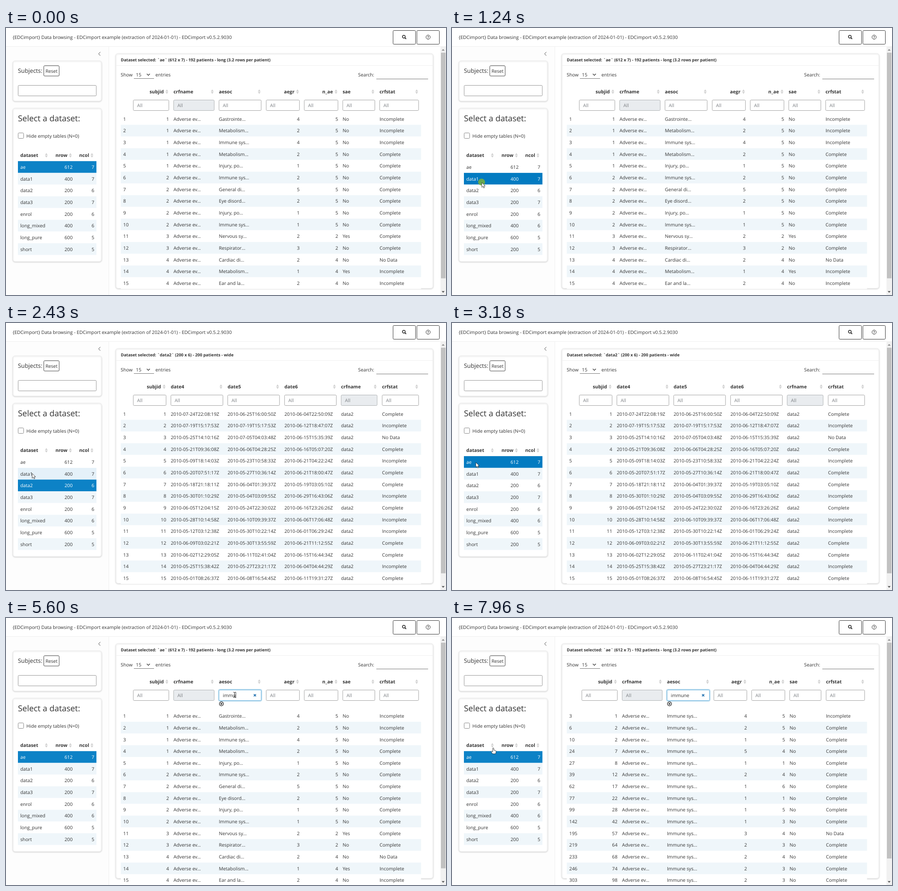
These frames come from a looping animation (960x584 px, 8000 ms). An HTML page with a canvas:

```html
<!DOCTYPE html>
<html lang="en">
<head>
<meta charset="utf-8">
<title>Data browsing</title>
<style>
html, body { margin: 0; width: 100%; height: 100%; overflow: hidden; background: #fff; }
canvas { display: block; }
</style>
</head>
<body>
<canvas id="stage" width="960" height="584"></canvas>
<script>
const ctx = document.getElementById('stage').getContext('2d');
const LOOP = 8000, ROW = 25.65, BASE = 10.26;
const INK = '#333', STRIPE = '#eff6fa', HOVER = '#e5f1f9', BLUE = '#007bc2';

// ---------- data ----------
const STATUS = { C: 'Complete', I: 'Incomplete', N: 'No Data' };
const words = s => s.split(' ');
const statuses = s => [...s].map(c => STATUS[c]);
const fill = value => Array(15).fill(value);
const count = Array.from({ length: 15 }, (_, i) => i + 1);
const pairs = list => count.map((_, i) => list[i >> 1]);
const dates = s => words(s).map(d => `2010-${d}Z`);

// Column: [name, left, right, align right, disabled filter]
const TABLES = {
  ae: {
    title: 'Dataset selected: `ae` (612 x 7) - 192 patients - long (3.2 rows per patient)',
    ids: count,
    columns: [['subjid', 277.5, 355.5, 1], ['crfname', 365.5, 454.5, 0, 1], ['aesoc', 464.5, 557],
      ['aegr', 567.5, 640.5, 1], ['n_ae', 650.5, 724.5, 1], ['sae', 734.5, 805], ['crfstat', 815, 900.5]],
    cells: [[...'111112222233444'], fill('Adverse ev...'),
      ['Gastrointe', 'Metabolism', 'Immune sys', 'Metabolism', 'Injury, po', 'Immune sys', 'General di',
       'Eye disord', 'Injury, po', 'Immune sys', 'Nervous sy', 'Respirator', 'Cardiac di', 'Metabolism',
       'Ear and la'].map(s => s + '...'),
      [...'424212521123212'], [...'555555555522444'],
      [...'NNNNNNNNNNYNNYN'].map(c => c === 'Y' ? 'Yes' : 'No'), statuses('IIICCCCCCCCCNII')]
  },
  data1: {
    title: 'Dataset selected: `data1` (400 x 7) - 200 patients - long (2 rows per patient)',
    ids: count,
    columns: [['subjid', 277.5, 336, 1], ['date1', 346, 455.5], ['date2', 466, 576], ['date3', 586, 696],
      ['x', 706, 744.5], ['crfname', 754.5, 822, 0, 1], ['crfstat', 832.5, 900.5]],
    cells: [pairs(count),
      pairs(dates('04-03T09:46:37 04-26T18:06:23 05-05T03:07:04 05-14T00:17:21 04-09T15:33:11 04-11T21:47:40 04-16T08:36:10 04-12T21:01:35')),
      pairs(dates('05-16T18:22:44 04-24T17:22:29 05-03T23:19:00 05-03T21:46:33 04-27T15:11:40 04-23T10:18:09 05-03T09:24:58 05-09T23:19:22')),
      pairs(dates('05-10T22:21:50 05-17T15:21:24 05-23T07:02:12 05-21T18:32:10 05-06T19:28:29 05-29T01:22:36 04-27T04:29:08 05-22T01:20:06')),
      [...'XXXXXXYYYYXXXXX'], fill('data1'), statuses('CCCCICNCICCCICC')]
  },
  data2: {
    title: 'Dataset selected: `data2` (200 x 6) - 200 patients - wide',
    ids: count,
    columns: [['subjid', 277.5, 349.5, 1], ['date4', 359.5, 473.5], ['date5', 483.5, 597], ['date6', 607.5, 721],
      ['crfname', 731, 810, 0, 1], ['crfstat', 820.5, 900.5]],
    cells: [count,
      dates('07-24T22:08:19 07-19T15:17:53 05-25T14:10:16 05-21T09:36:08 05-09T18:14:03 05-20T07:51:17 05-18T21:18:11 05-30T01:10:29 06-05T12:04:15 05-28T10:14:58 05-12T03:12:38 06-09T03:02:21 06-02T12:29:05 05-25T15:38:42 05-01T08:26:37'),
      dates('06-25T16:00:50 07-19T15:17:53 07-05T04:03:48 06-06T04:28:25 05-23T10:58:33 05-27T10:36:14 06-04T01:39:37 05-04T03:09:55 05-24T22:30:02 06-10T09:39:37 05-30T10:22:14 05-30T13:55:59 06-11T02:41:04 05-27T23:21:17 06-08T16:54:45'),
      dates('06-04T22:50:09 06-12T18:47:07 06-15T15:35:39 06-16T05:07:20 06-21T04:22:24 06-21T18:00:47 05-19T03:05:10 06-29T16:43:06 06-16T23:26:26 06-06T17:06:48 06-01T06:29:24 06-21T11:12:55 06-15T16:44:34 06-04T04:44:29 06-11T19:31:27'),
      fill('data2'), statuses('CINCICCICIICCIC')]
  }
};
TABLES.immune = {
  title: TABLES.ae.title,
  ids: words('3 6 10 24 27 39 62 77 99 142 195 219 233 246 303'),
  columns: [['subjid', 283, 361, 1], ['crfname', 371, 459, 0, 1], ['aesoc', 469, 562],
    ['aegr', 571, 643.5, 1], ['n_ae', 653.5, 726.5, 1], ['sae', 736.5, 805.5], ['crfstat', 816, 900.5]],
  cells: [words('1 2 2 7 8 12 17 22 28 42 57 64 68 74 98'), fill('Adverse ev...'), fill('Immune sys...'),
    [...'421512111132222'], [...'555414615343433'], fill('No'), statuses('ICCCCCCCCCNCCCC')]
};
const DATASETS = ['ae 612 7', 'data1 400 7', 'data2 200 6', 'data3 200 7', 'enrol 200 6',
  'long_mixed 400 6', 'long_pure 600 5', 'short 200 5'].map(words);

// ---------- timeline ----------
const SHOWN = [[0, 'ae'], [1500, 'data1'], [2370, 'data2'], [3400, 'ae'], [6130, 'immune']];
const SELECTED = [[0, 0], [1200, 1], [2000, 2], [3100, 0]];
const KEYS = [5070, 5270, 5400, 5600, 5800, 6060];
const CLICKS = [[1170, 1300], [1960, 2100], [3040, 3170], [4270, 4400]];
const CARET_OFF = [[4870, 5070], [6610, 7140], [7670, 8000]];
const FOCUS = 4270, CLEARABLE = 5070;
const PATH = [[200, 500, 540], [340, 322, 460], [560, 185, 403], [780, 95, 358], [960, 66, 346],
  [1030, 66, 343], [1240, 65, 338], [1500, 65, 338], [1960, 62, 354], [2100, 62, 354], [2300, 59, 338],
  [2780, 52, 305], [3400, 52, 305], [3730, 418, 197], [4010, 498.5, 168], [7010, 498.5, 168],
  [7820, 97, 289], [7960, 90, 284]];

const current = (list, t) => list.filter(([start]) => start <= t).pop()[1];
const during = (spans, t) => spans.some(([a, b]) => t >= a && t < b);

function pointerAt(t) {
  if (t < PATH[0][0]) return null;
  const next = PATH.findIndex(p => p[0] > t);
  if (next < 0) return PATH[PATH.length - 1].slice(1);
  const [t0, x0, y0] = PATH[next - 1], [t1, x1, y1] = PATH[next];
  const k = (t - t0) / (t1 - t0);
  return [x0 + (x1 - x0) * k, y0 + (y1 - y0) * k];
}

// ---------- drawing helpers ----------
function text(s, x, y, { size = BASE, color = INK, bold = false, align = 'left' } = {}) {
  ctx.font = `${bold ? 700 : 400} ${size}px "Open Sans", sans-serif`;
  ctx.textAlign = align;
  ctx.fillStyle = color;
  ctx.fillText(s, x, y + size * 0.388);
}
function rect(x, y, w, h, color) {
  ctx.fillStyle = color;
  ctx.fillRect(x, y, w, h);
}
function box(x, y, w, h, radius, stroke, background = '#fff') {
  ctx.beginPath();
  ctx.roundRect(x, y, w, h, radius);
  ctx.fillStyle = background;
  ctx.fill();
  ctx.lineWidth = 1;
  ctx.strokeStyle = stroke;
  ctx.stroke();
}
function line(points, color, width = 1) {
  ctx.beginPath();
  for (const [x, y] of points) ctx.lineTo(x, y);
  ctx.strokeStyle = color;
  ctx.lineWidth = width;
  ctx.stroke();
}
function circle(x, y, r, color, width) {
  ctx.beginPath();
  ctx.arc(x, y, r, 0, 7);
  ctx.fillStyle = ctx.strokeStyle = color;
  ctx.lineWidth = width || 1;
  width ? ctx.stroke() : ctx.fill();
}
function polygon(points, color) {
  ctx.beginPath();
  for (const [x, y] of points) ctx.lineTo(x, y);
  ctx.closePath();
  ctx.fillStyle = color;
  ctx.fill();
}
function card(x, y, w, h) {
  ctx.save();
  ctx.shadowColor = 'rgba(0,0,0,.16)';
  ctx.shadowBlur = 3;
  ctx.shadowOffsetY = 1;
  box(x, y, w, h, 5, '#ebebeb');
  ctx.restore();
}
function sortIcon(x, y) {
  polygon([[x - 3, y - 0.5], [x, y - 5], [x + 3, y - 0.5]], '#d2d2d2');
  polygon([[x - 3, y + 0.5], [x, y + 5], [x + 3, y + 0.5]], '#d2d2d2');
}
function cross(x, y, r, color, width) {
  line([[x - r, y - r], [x + r, y + r]], color, width);
  line([[x + r, y - r], [x - r, y + r]], color, width);
}

// ---------- page parts ----------
function drawHeader() {
  text('{EDCimport} Data browsing - EDCimport example (extraction of 2024-01-01) - EDCimport v0.5.2.9030', 14.5, 20.3);
  rect(0, 40, 960, 1, '#efefef');
  box(844.5, 5.5, 49, 30, 2, '#3a3a3a');
  box(896.5, 5.5, 49, 30, 2, '#3a3a3a');
  circle(868, 19, 3, '#222', 1.4);
  line([[870.2, 21.2], [873, 24]], '#222', 1.8);
  circle(921, 20, 4.6, '#222', 0.9);
  text('?', 921, 20, { size: 7.5, bold: true, align: 'center' });
}

function drawSidebar(t, pointer) {
  rect(0, 41, 224, 543, '#fdfdfd');
  rect(224, 41, 1, 543, '#efefef');
  line([[205.8, 52.5], [202, 56.5], [205.8, 60.5]], '#444');
  card(15, 72, 193.5, 88);
  text('Subjects:', 26, 92.8, { size: 12.82 });
  box(82.5, 82.5, 33.5, 22.5, 2, '#444');
  text('Reset', 99.3, 94, { align: 'center' });
  box(26.5, 125.5, 170.5, 23, 2, '#999');

  card(15, 175.5, 193.5, 335.5);
  text('Select a dataset:', 26, 197, { size: 17.95 });
  box(26.5, 229.5, 12, 12, 2, '#888');
  text('Hide empty tables (N=0)', 44.6, 236);
  [['dataset', 31.2, 'left', 88], ['nrow', 134, 'right', 140.5], ['ncol', 181.3, 'right', 187.5]]
    .forEach(([name, x, align, icon]) => {
      text(name, x, 278.5, { bold: true, align });
      sortIcon(icon, 278.5);
    });

  const selected = current(SELECTED, t);
  DATASETS.forEach(([name, rows, cols], i) => {
    const top = 291.2 + i * ROW, mid = top + ROW / 2;
    const hovered = pointer && pointer[0] > 26 && pointer[0] < 197 && pointer[1] >= top && pointer[1] < top + ROW;
    let color = INK, background = hovered ? HOVER : i % 2 ? STRIPE : '#fff';
    if (i === selected) {
      color = '#fff';
      background = hovered ? '#037bc1' : '#0d82c6';
    } else if (i === 1 && t >= 2000 && t < 2100) color = '#34806f';
    rect(26, top, 171.3, ROW, background);
    text(name, 31.2, mid, { color });
    text(rows, 145.3, mid, { color, align: 'right' });
    text(cols, 192.5, mid, { color, align: 'right' });
  });
}

function drawFilter(t, x0, x1, typed, disabled, active) {
  const focus = active && t >= FOCUS ? Math.min(1, (t - FOCUS) / 150) : 0;
  if (focus) {
    ctx.globalAlpha = focus;
    box(x0 - 1.5, 155.5, x1 - x0 + 3, 27, 4, '#c5e1f1', '#bfdef0');
    ctx.globalAlpha = 1;
  }
  box(x0 + 0.25, 157.5, x1 - x0 - 0.5, 23, 2, focus ? '#6db4dd' : disabled ? '#b0b3b5' : '#a3a3a3', disabled ? '#e9ecef' : '#fff');
  const left = x0 + 8.6;
  text(typed || 'All', left, 168.9, { color: typed ? INK : '#7b7f83' });
  if (!active) return;
  if (focus && !during(CARET_OFF, t)) {
    rect(left + (typed ? ctx.measureText(typed).width : 0), 162, 0.8, 13, '#111');
  }
  if (t >= CLEARABLE) {
    cross(x1 - 14, 169, 2.4, '#1f6fae', 1.6);
    circle(x0 + 5.5, 187.8, 4.4, '#111', 1.2);
    cross(x0 + 5.5, 187.8, 1.9, '#111', 1.2);
  }
}

function drawTable(t, pointer) {
  const table = TABLES[current(SHOWN, t)];
  card(239.5, 56, 692.5, 513.5);
  text(table.title, 250.5, 69.3, { size: 8.97, bold: true });
  rect(240, 81.5, 692, 1, '#efefef');
  text('Show', 250.3, 101.7);
  text('15', 283.6, 101.7);
  line([[307.3, 100.3], [310.6, 103.6], [313.9, 100.3]], '#333', 1.3);
  rect(279, 110, 44, 1, '#777');
  text('entries', 326, 101.7);
  text('Search:', 768.3, 102);
  rect(808, 111, 113, 1, '#777');

  const typed = 'immune'.slice(0, KEYS.filter(k => k <= t).length);
  table.columns.forEach(([name, x0, x1, right, disabled]) => {
    text(name, right ? x1 - 11.2 : x0, 139.3, { bold: true, align: right ? 'right' : 'left' });
    sortIcon(x1 - 4.5, 139.3);
    const active = name === 'aesoc';
    drawFilter(t, x0, x1, active ? typed : '', disabled, active);
  });

  const bodyTop = t >= CLEARABLE ? 201.4 : 186;
  table.ids.forEach((id, i) => {
    const top = bodyTop + i * ROW, mid = top + ROW / 2;
    const hovered = pointer && pointer[0] > 250 && pointer[0] < 905 && pointer[1] >= top && pointer[1] < top + ROW;
    rect(250.5, top, 655, ROW, hovered ? HOVER : i % 2 ? STRIPE : '#fff');
    text(id, 255.8, mid);
    table.columns.forEach(([, x0, x1, right], c) =>
      text(table.cells[c][i], right ? x1 : x0, mid, { align: right ? 'right' : 'left' }));
  });

  if (t >= 6810 && t < 6880) {
    box(514.5, 339.5, 127, 33, 3, '#d9d9d9');
    text('Processing...', 578, 348, { align: 'center' });
    for (let i = 0; i < 3; i++) circle(562 + i * 15.4, 363.5, 4, BLUE);
  }
}

function drawScrollbar(t) {
  rect(948, 41, 12, 543, '#f1f1f1');
  rect(949, 54, 10, (t >= 6130 ? 526 : 547.5) - 54, '#c1c1c1');
  polygon([[950.5, 49.5], [953.8, 46], [957, 49.5]], '#888');
  polygon([[950.5, 575.5], [953.8, 579], [957, 575.5]], '#505050');
}

const ARROW = [[0, 0], [0, 10.5], [2.5, 8.2], [4.2, 12], [5.9, 11.2], [4.3, 7.6], [7.5, 7.4]];
const HAND = [[-1.2, 0.8], [0, 0], [1.2, 0.8], [1.2, 5], [4, 5.4], [6, 6.8], [6, 10], [4.8, 13],
  [-1.5, 13], [-4.6, 8.2], [-3.6, 7.2], [-1.2, 8.8]];

function drawPointer(t, [x, y]) {
  if (during(CLICKS, t)) circle(x - 0.5, y - 1, 7.6, 'rgba(126,178,56,.82)');
  const overText = x > 250 && y < 212;
  if (overText) {
    line([[x - 2.5, y - 6], [x, y - 5], [x + 2.5, y - 6]], '#222');
    line([[x, y - 5], [x, y + 5]], '#222');
    line([[x - 2.5, y + 6], [x, y + 5], [x + 2.5, y + 6]], '#222');
    return;
  }
  const shape = x < 210 && y < 291 ? HAND : ARROW;
  const points = shape.map(([dx, dy]) => [x + dx, y + dy]);
  polygon(points, '#fff');
  line([...points, points[0]], '#222', 0.8);
}

function draw(t) {
  const pointer = pointerAt(t);
  rect(0, 0, 960, 584, '#fff');
  drawHeader();
  drawSidebar(t, pointer);
  drawTable(t, pointer);
  drawScrollbar(t);
  if (pointer) drawPointer(t, pointer);
}

ctx.textRendering = 'geometricPrecision';
const start = performance.now();
function tick() {
  draw((performance.now() - start) % LOOP);
  requestAnimationFrame(tick);
}
tick();
</script>
</body>
</html>
```
